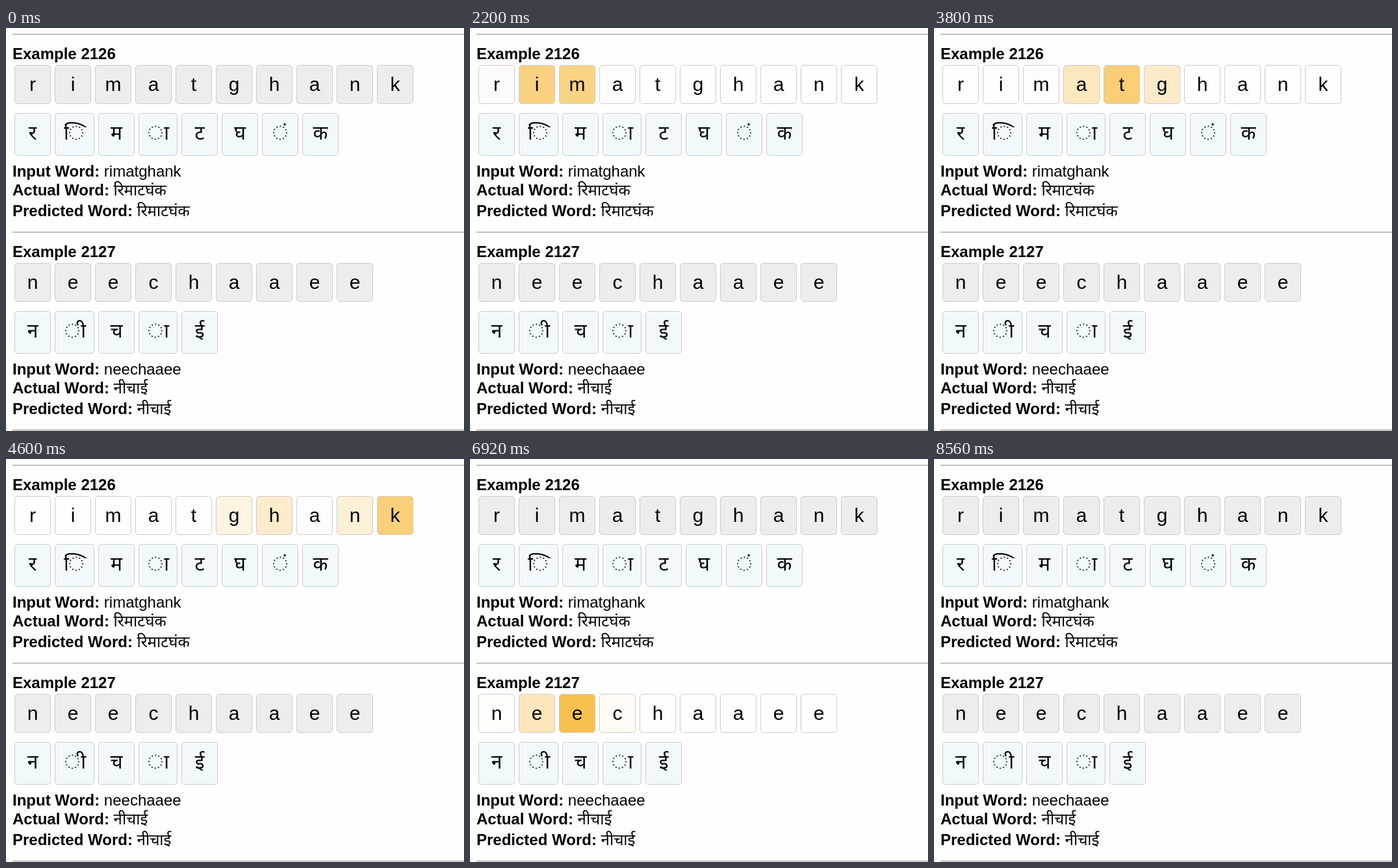
An HTML page that plays this animation: 705x621 px, repeating every 8920 ms.

```html
<!DOCTYPE html>
<html lang="en">
<head>
<meta charset="utf-8">
<title>Transliteration attention</title>
<style>
html, body { margin: 0; width: 100%; height: 100%; overflow: hidden; background: #fefefe; }
svg { display: block; }
text { font: 24px "Liberation Sans", "Lohit Devanagari", "Noto Sans Devanagari", sans-serif; white-space: pre; }
.bold { font-weight: bold; }
.light { font-weight: 300; }
.tile { font-size: 30px; font-weight: 300; text-anchor: middle; }
.box { stroke: #ccc; }
.ring { fill: none; stroke: #000; stroke-width: 2; stroke-linecap: round; }
</style>
</head>
<body>
<svg id="stage" width="705" height="621" viewBox="0 0 705 621"></svg>
<script>
const LOOP = 8920, FADE = 400, STEP = 40;
const GREY = [237, 237, 237], WHITE = [254, 254, 254], AMBER = [244, 164, 0];
const stage = document.getElementById('stage');

// Attention is a bell curve over the input letters, one per hovered output letter
const hover = (at, focus, spread = .5) => ({ at, focus, spread });
const leave = at => ({ at });

const examples = [
  {
    top: 0, title: 'Example 2126', input: 'rimatghank', word: 'रिमाटघंक',
    hovers: [
      hover(1090, .8, .6), hover(1890, 1.5), hover(2740, 2.45, .8), hover(3340, 3.5),
      hover(3680, 4.4), hover(4060, 5.65), hover(4440, 8.8), hover(4760, 9), leave(5080)
    ]
  },
  {
    top: 305, title: 'Example 2127', input: 'neechaaee', word: 'नीचाई',
    hovers: [
      hover(6130, .4), hover(6600, 1.75), hover(7130, 3.4),
      hover(7400, 5.4), hover(7660, 7.6), leave(8220)
    ]
  }
];

function add(name, attrs, text, parent = stage) {
  const el = document.createElementNS('http://www.w3.org/2000/svg', name);
  for (const k in attrs) el.setAttribute(k, attrs[k]);
  if (text) el.textContent = text;
  return parent.appendChild(el);
}

function rule(y) {
  add('rect', { x: 10, y, width: 695, height: 1, fill: '#9a9a9a' });
  add('rect', { x: 10, y: y + 1, width: 695, height: 1, fill: '#eee' });
}

function box(x, y, w, h, fill) {
  return add('rect', { class: 'box', x: x + .5, y: y + .5, width: w - 1, height: h - 1, rx: 4.5, fill });
}

function glyph(x, y, char, anchor = 'middle') {
  add('text', { class: 'tile', x, y, style: `text-anchor: ${anchor}` }, char);
}

// Vowel signs stand on a dotted ring; x and anchor are measured from the tile's left edge
const signs = {
  'ि': { w: 61, ring: 33, x: 14, anchor: 'start' },
  'ी': { w: 61, ring: 27, x: 48, anchor: 'end' },
  'ा': { w: 60, ring: 26, x: 47, anchor: 'end' },
  'ं': { w: 56, ring: 28, x: 35, anchor: 'middle' }
};

function outputTile(x, y, char) {
  const sign = signs[char], w = sign ? sign.w : 56;
  box(x, y, w, 66, '#f1f9fd');
  if (sign) {
    const r = 10;
    add('circle', {
      class: 'ring', cx: x + sign.ring, cy: y + 30.5, r,
      'stroke-dasharray': `0 ${2 * Math.PI * r / 12}`
    });
    glyph(x + sign.x, y + 41, '\u00a0' + char, sign.anchor);
  } else {
    glyph(x + w / 2, y + 41, char);
  }
  return w;
}

function line(y, label, value) {
  const el = add('text', { x: 10, y });
  add('tspan', { class: 'bold' }, label, el);
  add('tspan', { class: 'light' }, ' ' + value, el);
}

function build(ex) {
  const y = ex.top;
  add('text', { class: 'bold', x: 10, y: y + 48 }, ex.title);
  ex.boxes = [...ex.input].map((char, i) => {
    const x = 13 + 62 * i, el = box(x, y + 57, 56, 60);
    glyph(x + 28, y + 97, char);
    return el;
  });
  let x = 13;
  for (const char of ex.word) x += outputTile(x, y + 131, char) + 6;
  line(y + 229, 'Input Word:', ex.input);
  line(y + 258, 'Actual Word:', ex.word);
  line(y + 290, 'Predicted Word:', ex.word);

  for (const h of ex.hovers) {
    const bell = ex.boxes.map((_, i) => Math.exp(-(((i - h.focus) / h.spread) ** 2) / 2));
    const sum = bell.reduce((a, b) => a + b);
    h.goals = bell.map(v => 'focus' in h ? mix(WHITE, AMBER, v / sum) : GREY);
  }
}

const mix = (a, b, k) => a.map((v, i) => v + (b[i] - v) * k);

// CSS "ease": cubic-bezier(.25, .1, .25, 1)
function ease(x) {
  if (x <= 0) return 0;
  if (x >= 1) return 1;
  let lo = 0, hi = 1, s = .5;
  for (let i = 0; i < 20; i++) {
    s = (lo + hi) / 2;
    if (.75 * s * (1 - s) + s ** 3 < x) lo = s; else hi = s;
  }
  return .3 * s * (1 - s) ** 2 + 3 * s * s * (1 - s) + s ** 3;
}

// Each fade sets out from whatever colour the previous one had reached
function colour(hovers, i, t) {
  let c = GREY;
  hovers.forEach((h, n) => {
    const next = hovers[n + 1];
    const until = next ? Math.min(t, next.at) : t;
    c = mix(c, h.goals[i], ease((until - h.at) / FADE));
  });
  return `rgb(${c.map(Math.round)})`;
}

function draw() {
  const t = Math.floor(((performance.now() - begin) % LOOP) / STEP) * STEP;
  for (const ex of examples)
    ex.boxes.forEach((el, i) => el.setAttribute('fill', colour(ex.hovers, i, t)));
  requestAnimationFrame(draw);
}

[9, 314, 619].forEach(rule);
examples.forEach(build);
const begin = performance.now();
draw();
</script>
</body>
</html>
```
